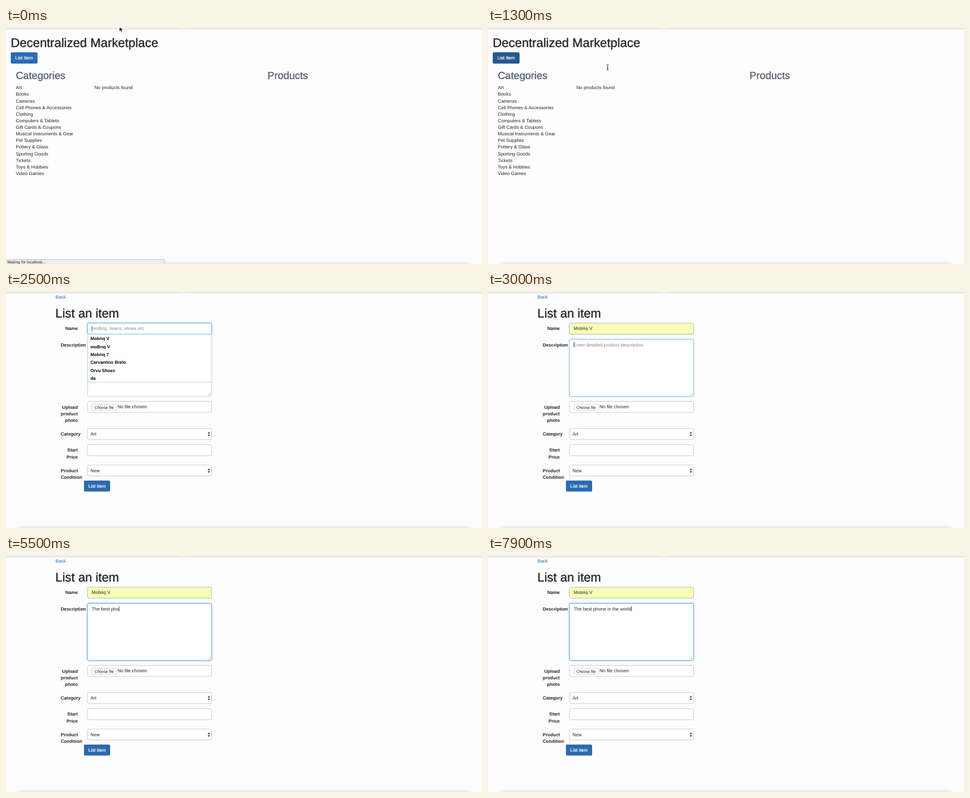
Animation, 800 px wide and 398 px high, one loop 8000 ms. Source, as an HTML page:

```html
<!DOCTYPE html>
<html lang="en">
<head>
<meta charset="utf-8">
<title>Marketplace form</title>
<style>
html, body { margin: 0; width: 100%; height: 100%; overflow: hidden; background: #fdfdfe; }
svg { display: block; width: 100vw; height: 100vh; }
text { font: 7.85px "Liberation Sans", Arial, sans-serif; fill: #212529; text-rendering: geometricPrecision; white-space: pre; }
.h1 { font-size: 20.95px; stroke: #212529; stroke-width: .35; }
.h2 { font-size: 17.3px; fill: #535e69; stroke: #535e69; stroke-width: .3; }
.b { font-weight: bold; font-size: 7.7px; }
.opt { font-weight: bold; font-size: 7.4px; fill: #000; }
.btn { fill: #fff; stroke: #fff; stroke-width: .2; }
.hint { fill: #858a8f; }
.link { fill: #2a6cb0; }
.small { font-size: 6.5px; fill: #111; }
.field { fill: #fff; stroke: #c6cacf; stroke-width: .9; }
.focus { fill: #fff; stroke: #78b6ea; stroke-width: 1; filter: drop-shadow(0 0 1.6px rgba(90, 170, 235, .75)); }
</style>
</head>
<body>
<svg id="stage" viewBox="0 0 800 398" preserveAspectRatio="none"></svg>
<script>
const LOOP = 8000;
const NOTE = 'The best phone in the world';
const stage = document.getElementById('stage');

const text = (x, y, str, cls = '', more = '') =>
  `<text x="${x}" y="${y}" class="${cls}" ${more}>${str.replace(/&/g, '&amp;')}</text>`;
const box = (x, y, w, h, more = 'class="field"', r = 2) =>
  `<rect x="${x}" y="${y}" width="${w}" height="${h}" rx="${r}" ${more}/>`;
const field = (y, h, more) => box(137, y, 208.5, h, more);
const label = (y, str) => text(120.6, y, str, 'b', 'text-anchor="end"');
const longLabel = (y, str) => text(92, y, str, 'b');
const select = (y, str) => field(y, 18.6) + text(142, y + 12, str) +
  `<path d="M339 ${y + 8.6}h3.8l-1.9 -3zM339 ${y + 10.4}h3.8l-1.9 3z" fill="#333"/>`;
const group = (id, body) => `<g id="${id}">${body}</g>`;

const categories = ['Art', 'Books', 'Cameras', 'Cell Phones & Accessories', 'Clothing',
  'Computers & Tablets', 'Gift Cards & Coupons', 'Musical Instruments & Gear', 'Pet Supplies',
  'Pottery & Glass', 'Sporting Goods', 'Tickets', 'Toys & Hobbies', 'Video Games'];
const options = ['Mobriq V', 'moBriq V', 'Mobriq 7', 'Carvantino Brelo', 'Orvu Shoes', 'da'];

const home =
  text(8, 32, 'Decentralized Marketplace', 'h1') +
  box(8, 41, 45, 19, 'id="open"') + text(15.6, 53.3, 'List Item', 'btn') +
  text(16.4, 86, 'Categories', 'h2') + text(439.5, 86, 'Products', 'h2') +
  categories.map((c, i) => text(16.5, 103.3 + i * 11.13, c)).join('') +
  text(148.7, 103.3, 'No products found');

const form =
  text(83.2, 11, 'Back', 'link') + text(83, 43, 'List an item', 'h1') +
  label(64.4, 'Name') + longLabel(91.5, 'Description') +
  label(196.7, 'Upload') + label(207.8, 'product') + label(218.9, 'photo') +
  longLabel(242.2, 'Category') + label(269.4, 'Start') + label(280.6, 'Price') +
  longLabel(304, 'Product') + longLabel(315.1, 'Condition') +
  field(52.5, 18.5) + field(52.5, 18.5, 'id="nameFocus" class="focus"') +
  field(52.5, 18.5, 'id="filled" fill="#faffb5" stroke="#b4c2cc" stroke-width=".9"') +
  text(144, 64.4, '', '', 'id="nameText"') +
  field(80, 96) + field(80, 96, 'id="noteFocus" class="focus"') +
  text(144, 91.5, '', '', 'id="noteText"') +
  '<path d="M340 174.5l4 -4M342.3 174.5l1.7 -1.7" stroke="#888" stroke-width=".6"/>' +
  field(184.5, 18.5) +
  box(144.5, 189.3, 41, 10, 'fill="#fff" stroke="#c4c4c4" stroke-width=".7"') +
  text(148.7, 196.8, 'Choose file', 'small') + text(187.2, 195.6, 'No file chosen') +
  select(230.2, 'Art') + field(257.5, 18.5) + select(291.8, 'New') +
  box(131, 318, 44, 18.6, 'fill="#2c6bb0"') + text(138.3, 330.1, 'List item', 'btn') +
  group('menu', box(137, 71.3, 208.9, 80.7, 'fill="#fff" stroke="#b4d3e6" stroke-width=".9"', 0) +
    options.map((o, i) => text(142, 81.2 + i * 13.35, o, 'opt')).join('')) +
  '<path id="caret" stroke="#222" stroke-width=".7"/>';

stage.innerHTML =
  '<rect width="800" height="398" fill="#fdfdfe"/>' +
  '<rect width="800" height="2.4" fill="#e7e7ea"/><rect x="291" width="10" height="1" fill="#f8f8f9"/>' +
  '<rect x="22" y="399" width="756" height="12" fill="#000" opacity=".24" style="filter:blur(4px)"/>' +
  group('home', home) + group('form', form) +
  group('status', box(-1, 390.3, 267.6, 10, 'fill="#ededee" stroke="#bcbcbe" stroke-width=".8"', 1) +
    text(2, 397, 'Waiting for localhost...', '', 'style="font-size:6.6px"')) +
  '<path id="arrow" d="M0 0V8.6L2 6.8L3.4 9.8L4.8 9.2L3.5 6.3H6.2Z" fill="#111" stroke="#fff" stroke-width=".6"/>' +
  '<path id="beam" d="M-1.8 -4.5Q0 -4.5 0 -3.2Q0 -4.5 1.8 -4.5M0 -3.2V3.2M-1.8 4.5Q0 4.5 0 3.2Q0 4.5 1.8 4.5M-1 1.2H1" fill="none" stroke="#222" stroke-width=".9"/>';

const el = id => document.getElementById(id);
const show = (id, on) => el(id).setAttribute('display', on ? 'inline' : 'none');
const fade = (id, v) => el(id).setAttribute('opacity', v);
const ramp = (t, start, span) => Math.min(1, Math.max(0, (t - start) / span));
const ease = p => p * p * (3 - 2 * p);
const put = (id, str, hint) => {
  el(id).textContent = str;
  el(id).setAttribute('class', hint ? 'hint' : '');
};

function pointer(t) {
  const go = ease(ramp(t, 0, 700)), back = ease(ramp(t, 850, 450));
  return [190.5 - 155.5 * go + 166 * back, -2.5 + 53.5 * go + 15.3 * back];
}

// Keystrokes come at three different speeds.
function typed(t) {
  const n = 7 * ramp(t, 3300, 1000) + 10 * ramp(t, 4300, 2400) + 10 * ramp(t, 6700, 1200);
  return NOTE.slice(0, Math.floor(n + 1e-6));
}

function draw(t) {
  const onForm = t >= 1600, chosen = t >= 2800, inNote = t >= 2900;
  show('home', !onForm);
  show('form', onForm);
  show('status', t < 500);

  const [x, y] = pointer(t), beam = t >= 1200;
  show('arrow', !beam);
  show('beam', beam && t < 2200);
  for (const id of ['arrow', 'beam']) el(id).setAttribute('transform', `translate(${x} ${y})`);
  el('open').setAttribute('fill', t >= 650 ? '#27588c' : '#2c6bb0');
  if (!onForm) return;

  fade('nameFocus', ramp(t, 2000, 150) - ramp(t, 2900, 150));
  fade('noteFocus', ramp(t, 2920, 150));
  show('filled', chosen);
  show('menu', t >= 2200 && !chosen);
  put('nameText', chosen ? options[0] : 'moBriq, Jeans, shoes etc', !chosen);

  const note = typed(Math.floor(t / 100) * 100);
  put('noteText', note || 'Enter detailed product description', !note);
  show('caret', t >= 2000);
  const start = inNote ? (note ? el('noteText').getComputedTextLength() : 0)
    : (chosen ? el('nameText').getComputedTextLength() : 0);
  el('caret').setAttribute('d', `M${144.4 + start} ${inNote ? 84.3 : 57.2}v9`);
}

const began = performance.now();
function tick() {
  draw((performance.now() - began) % LOOP);
  requestAnimationFrame(tick);
}
tick();
</script>
</body>
</html>
```
